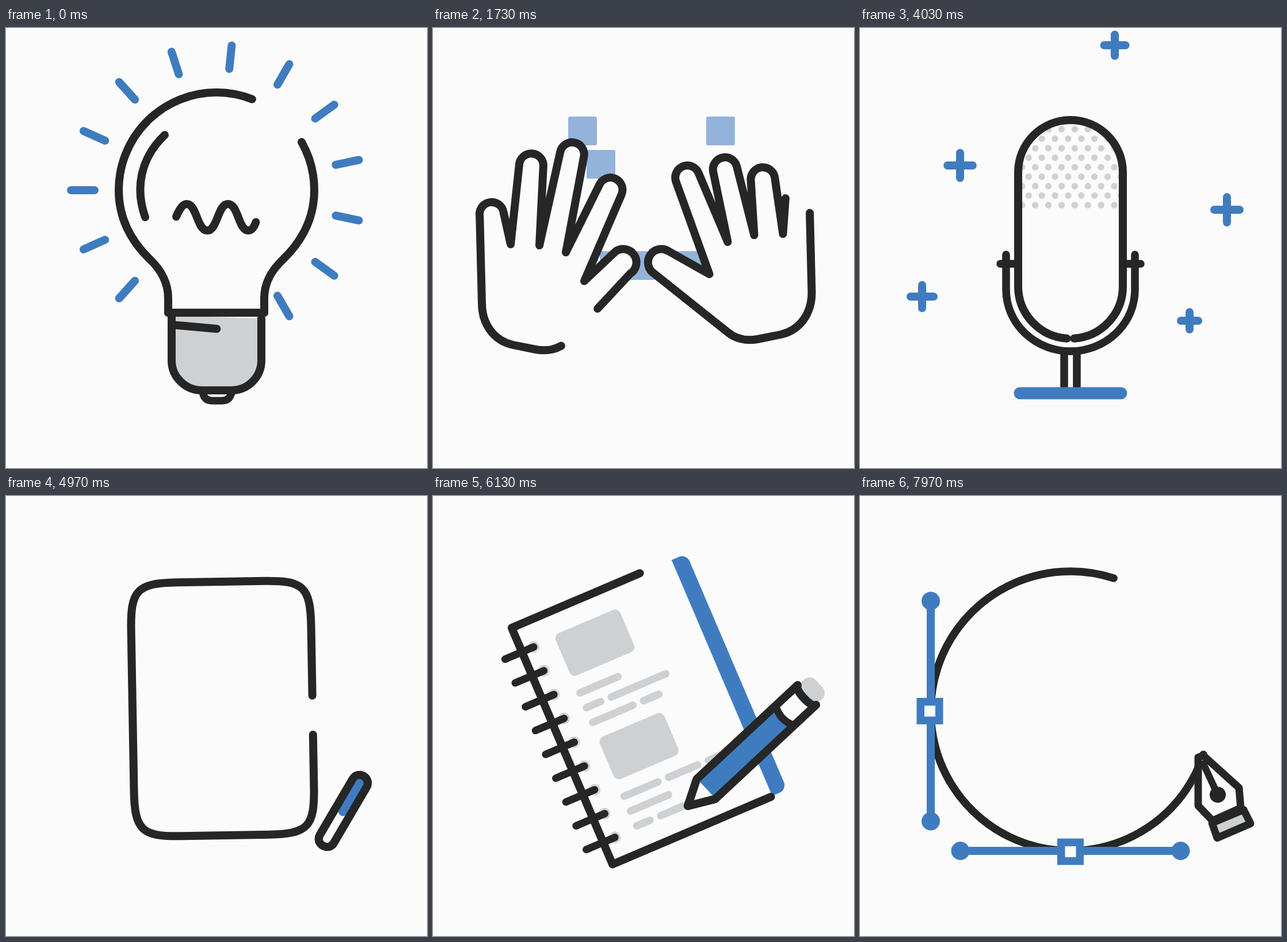
An HTML page for the animation above (8000 ms loop, 732 px wide and 765 px high).

```html
<!DOCTYPE html>
<html lang="en">
<head>
<meta charset="utf-8">
<title>Creative tools</title>
<style>
html, body { margin: 0; width: 100%; height: 100%; overflow: hidden; background: #fbfbfb; }
svg { display: block; width: 100vw; height: 100vh; }
text { font: 700 52px Inter, "Open Sans", sans-serif; text-anchor: middle; }
</style>
</head>
<body>
<svg id="stage" viewBox="0 0 732 765"></svg>
<script>
const LOOP = 8000;
const INK = '#262626', BLUE = '#3f7cbf', GRAY = '#cdd1d4', PAPER = '#fbfbfb';
const stage = document.getElementById('stage');
const updates = [];

const set = (node, attrs) => {
  for (const name in attrs) node.setAttribute(name, attrs[name]);
  return node;
};
const el = (tag, attrs = {}, parent = stage) =>
  parent.appendChild(set(document.createElementNS('http://www.w3.org/2000/svg', tag), attrs));
const stroke = (d, parent, extra = {}) => el('path', {
  d, pathLength: 100, fill: 'none', stroke: INK, 'stroke-width': 14,
  'stroke-linecap': 'round', 'stroke-linejoin': 'round', ...extra
}, parent);
const show = (node, on) => set(node, { display: on ? 'inline' : 'none' });

const clamp = x => Math.max(0, Math.min(1, x));
const smooth = x => { x = clamp(x); return x * x * (3 - 2 * x); };
const ramp = (t, from, to) => smooth((t - from) / (to - from));
const span = (t, inA, inB, outA, outB) => ramp(t, inA, inB) - ramp(t, outA, outB);
const mix = (a, b, p) => a + (b - a) * p;
const mixAll = (a, b, p) => a.map((v, i) => mix(v, b[i], p));
const wave = (t, period) => Math.sin(2 * Math.PI * t / period);

let seed = 7;
const random = () => (seed = seed * 16807 % 2147483647) / 2147483647;

// Shows the part of a path between a and b (0..100, wrapping on closed paths).
function trim(node, a, b) {
  const len = b - a;
  set(node, {
    visibility: len > 0.05 ? 'visible' : 'hidden',
    'stroke-dasharray': len > 99.95 ? 'none' : `${len} ${100 - len}`,
    'stroke-dashoffset': -a
  });
}
const gapAt = (node, centre, width) => trim(node, centre + width / 2, centre + 100 - width / 2);

function bulb() {
  const g = el('g');
  const rays = [];
  for (let k = 0; k < 15; k++) {
    const a = Math.PI * (1 + k * 24 / 180);
    const x = Math.cos(a), y = Math.sin(a);
    if (y < 0.93) rays.push({ x, y, node: stroke('', g, { stroke: BLUE }) });
  }
  const glass = stroke('M282 495V470C282 440 268 419 250 402C216 369 196 330 196 282' +
    'A170 170 0 0 1 536 282C536 330 516 369 482 402C464 419 449 440 449 470V495', g);
  const cap = stroke('M342 634Q345 648 358 648H376Q389 648 392 634', g, { fill: PAPER, 'stroke-width': 13 });
  const socket = stroke('M288 500V578A53 52 0 0 0 341 630H392A52 52 0 0 0 444 578V505', g, { fill: GRAY });
  const thread = stroke('M288 516L444 530', g);
  const bar = stroke('M282 495H449', g);
  const shine = stroke('M276 186C234 226 224 278 242 329', g);
  const filament = stroke('M296 328Q305 306 314 306c18 0 18 46 36 46s18 -46 36 -46s18 46 35 46Q432 352 437 328', g);

  updates.push(t => {
    show(g, t < 1450);
    gapAt(glass, 62, 11.5 * (1 - ramp(t, 0, 160)) + 100 * ramp(t, 950, 1400));
    const out = ramp(t, 950, 1350) * 100;
    for (const part of [cap, socket, bar, shine]) trim(part, out, 100);
    set(socket, { 'fill-opacity': 1 - out / 100 });
    trim(thread, out, Math.max(out, mix(50, 100, clamp(t / 200))));
    trim(filament, out, Math.max(out, mix(96, 100, clamp(t / 80))));
    const outer = 253 + 29 * wave(t, 1400) ** 2;
    const inner = outer - 41 * (1 - ramp(t, 1000, 1250));
    for (const { x, y, node } of rays) {
      set(node, {
        d: `M${366 + x * inner} ${282 + y * inner}L${366 + x * outer} ${282 + y * outer}`,
        visibility: t < 1240 ? 'visible' : 'hidden'
      });
    }
  });
}

function keyboard() {
  const press = (time, x, y, width = 50) => {
    const key = el('rect', { x, y, width, height: 50, rx: 3, fill: '#78a0d3' });
    updates.push(t => set(key, { opacity: clamp(1.6 - Math.abs(t - time) / 100) }));
  };
  press(1650, 235, 154);
  press(1650, 475, 154);
  press(1650, 267, 212);
  press(1650, 290, 388, 185);
  for (let time = 1900; time < 2450; time += 100) {
    const row = Math.floor(random() * 3), column = Math.floor(random() * 9);
    press(time, 55 + row * 27 + column * 60, 154 + row * 58.5);
  }
  press(2585, 101, 271);
  press(2585, 281, 271);
  press(2670, 136, 202);
  press(2670, 535, 154);

  [...'TOP'].forEach((char, i) => {
    const start = 1750 + i * 350;
    const letter = el('text', {
      x: [260, 560, 448][i], fill: GRAY, stroke: GRAY, 'stroke-width': 9, 'stroke-linejoin': 'round'
    });
    letter.textContent = char;
    updates.push(t => set(letter, {
      y: 196 - 100 * clamp((t - start) / 511),
      opacity: span(t, start, start + 100, start + 350, start + 500)
    }));
  });
}

// A left hand; curl lowers each fingertip, spread fans them out.
function handPath(curl, spread, sx, sy, thumb, drop) {
  const valleys = [[71, 360], [119, 363], [169, 365], [215, 377], [247, 427 + drop]];
  const reach = [[95, 291], [158, 218], [223, 210], [285, 268]];
  const at = (x, y) => `${x + sx} ${y + sy}`;
  let d = `M${at(69, 465)}`;
  reach.forEach(([rx, ry], i) => {
    const x = rx + (i - 1.5) * spread - curl[i] * 0.08, y = ry + curl[i];
    const [a, b] = [valleys[i], valleys[i + 1]];
    const dx = x - (a[0] + b[0]) / 2, dy = y - (a[1] + b[1]) / 2;
    const n = 21 / Math.hypot(dx, dy);
    d += `L${at(x + dy * n, y - dx * n)}A21 21 0 0 1 ${at(x - dy * n, y + dx * n)}L${at(...b)}`;
  });
  return d + `L318 ${388 + thumb}A23 23 0 0 1 343 ${427 + thumb}L${at(215, 534)}` +
    `C${at(203, 544)} ${at(185, 550)} ${at(163, 546)}L${at(123, 538)}` +
    `C${at(88, 530)} ${at(69, 500)} ${at(69, 465)}Z`;
}

function hands() {
  const sides = [
    { curls: [[20, 8, -3, 0], [9, 24, 10, 16]], spread: 5, shift: [16, 13], drop: 0, gaps: [87.8, 6] },
    { curls: [[14, 50, 41, -3], [0, 0, 23, 15]], spread: 0, shift: [0, -5], drop: 6, gaps: [10.4, 93.6],
      flip: 'matrix(-1 0 0 1 727.5 0)' }
  ];
  for (const { curls, spread, shift, drop, gaps, flip } of sides) {
    const hand = stroke('', stage, { fill: PAPER, transform: flip || '' });
    updates.push(t => {
      const on = t > 1280 && t < 2990;
      show(hand, on);
      if (!on) return;
      const p = ramp(t, 1730, 2670);
      const tap = t > 1730 && t < 2670 ? 12 * wave(t - 1730, 470) : 0;
      const curl = mixAll(...curls, p).map((c, i) => c + (i % 2 ? tap : -tap));
      set(hand, { d: handPath(curl, spread * (1 - p), shift[0] * (1 - p), shift[1] * (1 - p), drop * p, drop) });
      gapAt(hand, gaps[t < 2200 ? 0 : 1], 100 * (1 - span(t, 1280, 1800, 2620, 2990)));
    });
  }
}

function microphone() {
  const g = el('g');
  const dots = el('pattern', {
    id: 'dots', x: 339, y: 167.5, width: 22.9, height: 33, patternUnits: 'userSpaceOnUse'
  }, el('defs', {}, g));
  for (const [cx, cy] of [[11.45, 8.5], [0, 25], [22.9, 25]]) el('circle', { cx, cy, r: 5.7, fill: GRAY }, dots);
  const grill = el('path', { d: 'M275 314V251A91 91 0 0 1 457 251V314Z', fill: 'url(#dots)' }, g);
  const lines = ['M366 562A112 107 0 0 1 254 455V394', 'M366 562A112 107 0 0 0 478 455V394',
    'M275 410H244', 'M457 410H488', 'M355 564V626', 'M377 564V626'
  ].map(d => stroke(d, g, { 'stroke-width': 13.5 }));
  const base = stroke('', g, { stroke: BLUE, 'stroke-width': 21 });
  const pluses = [[443, 30, 0], [174, 239, 0.2], [638, 316, 0.25], [108, 467, 0.07], [573, 509, 0.75]]
    .map(([x, y, phase]) => ({ x, y, phase, node: stroke('', g, { stroke: BLUE }) }));

  updates.push(t => {
    show(g, t > 3000 && t < 4560);
    set(grill, { opacity: span(t, 3150, 3400, 4200, 4400) });
    const shown = span(t, 3000, 3330, 4220, 4550);
    lines.forEach(line => trim(line, 0, 100 * shown));
    set(base, {
      d: `M${366 - 88 * shown} 635H${366 + 88 * shown}`,
      visibility: shown > 0.01 ? 'visible' : 'hidden'
    });
    const size = span(t, 3050, 3350, 4300, 4550);
    for (const { x, y, phase, node } of pluses) {
      const r = (18.5 + 3.5 * wave(t - 4030 + phase * 800, 800)) * size;
      set(node, {
        d: `M${x - r} ${y}H${x + r}M${x} ${y - r}V${y + r}`,
        visibility: size > 0.02 ? 'visible' : 'hidden'
      });
    }
  });
}

// Rounded frame around the origin, clockwise from the middle of its right side.
function framePath(w, h, r, k) {
  const x = w / 2, y = h / 2, c = r * (1 - k);
  return `M${x} 0V${y - r}C${x} ${y - c} ${x - c} ${y} ${x - r} ${y}H${r - x}` +
    `C${c - x} ${y} ${-x} ${y - c} ${-x} ${y - r}V${r - y}` +
    `C${-x} ${c - y} ${c - x} ${-y} ${r - x} ${-y}H${x - r}` +
    `C${x - c} ${-y} ${x} ${c - y} ${x} ${r - y}Z`;
}

function notebook() {
  // Centre, size, corner radius, corner tightness and turn.
  const capsule = [366, 350, 182, 380, 91, 0.552, 0];
  const sheet = [376.5, 369.5, 313, 441, 80, 0.85, -1];
  const book = [362.5, 376, 300, 447, 0, 0.85, -23.1];
  const paragraphs = [[[72], [27, 103], [76, 29]], [[64, 55, 33], [72], [25, 50]]];

  const g = el('g');
  const blocks = [], words = [];
  paragraphs.forEach((rows, n) => {
    const top = -183 + n * 195.5;
    blocks.push(el('rect', { x: -88, y: top, rx: 10, fill: GRAY }, g));
    rows.forEach((lengths, row) => {
      let x = -85;
      for (const length of lengths) {
        words.push(stroke(`M${x} ${top + 110 + row * 28}h${length}`, g, { stroke: GRAY, 'stroke-width': 13 }));
        x += length + 20;
      }
    });
  });
  const cover = el('path', { fill: BLUE }, g);
  const ringY = Array.from({ length: 9 }, (_, i) => -178 + i * 45);
  const holes = ringY.map(cy => el('circle', { cx: -128, cy, fill: GRAY }, g));
  const frame = stroke('', g);
  const rings = ringY.map(y => stroke(`M-182 ${y}h54`, g, { 'stroke-width': 13 }));

  updates.push(t => {
    show(g, t > 2950 && t < 6550);
    const pose = mixAll(mixAll(capsule, sheet, ramp(t, 4100, 4970)), book, ramp(t, 4970, 5550));
    const [cx, cy, w, h, r, k, turn] = pose;
    set(g, { transform: `translate(${cx} ${cy}) rotate(${turn})` });
    set(frame, { d: framePath(w, h, r, k) });

    const centre = 25 * (1 - ramp(t, 4030, 5100));
    const gap = 1.3 * ramp(t, 3950, 4030) + 3.5 * ramp(t, 4030, 4970) + 25.2 * ramp(t, 4970, 5500);
    const hidden = 100 * (1 - ramp(t, 2950, 3330)) + 70 * ramp(t, 6070, 6500);
    trim(frame, centre + gap / 2, centre + 100 - gap / 2 - hidden);

    const strip = 446 * span(t, 5200, 5600, 6170, 6480);
    set(cover, {
      d: strip > 28 ? `M152 223v${-strip}h14a14 14 0 0 1 14 14v${strip - 28}a14 14 0 0 1 -14 14Z` : ''
    });
    const grown = (i, step) => span(t, 5300 + i * step, 5520 + i * step, 6170 + i * 8, 6370 + i * 8);
    blocks.forEach((block, i) => set(block, { width: 122 * grown(i, 200), height: 80 * grown(i, 200) }));
    words.forEach((word, i) => trim(word, 0, 100 * grown(i, 55)));
    rings.forEach((ring, i) => {
      const out = 6180 + i * 15;
      set(holes[i], { r: 10 * span(t, 4930 + i * 45, 5200 + i * 45, out, out + 170) });
      trim(ring, 0, 100 * span(t, 5080 + i * 45, 5350 + i * 45, out, out + 170));
    });
  });
}

function pencil() {
  const g = el('g');
  const eraser = el('rect', { x: 270, y: -23, height: 46, rx: 14, fill: GRAY }, g);
  const body = stroke('', g, { fill: PAPER });
  const paint = el('rect', { fill: BLUE }, g);
  const outline = stroke('', g);
  const band = stroke('M230 -22Q219 0 230 22', g, { 'stroke-width': 13 });

  updates.push(t => {
    show(g, t > 4600 && t < 6420);
    const arrive = ramp(t, 4600, 4970), leave = ramp(t, 6200, 6420), p = ramp(t, 4970, 5450);
    const scribble = t > 5500 && t < 6130 ? wave(t - 6130, 210) : 0;
    const x = mix(mix(640, 558, arrive), 443, p) + 25 * scribble;
    const y = mix(mix(700, 596, arrive), 539, p) - 20 * scribble - 340 * leave;
    set(g, { transform: `translate(${x} ${y}) rotate(${mix(-59.6, -43, p)}) scale(${arrive - leave})` });

    // A tapered stick with round ends grows into a sharpened pencil.
    const tip = mix(14, 0, p), neck = mix(40, 43, p), half = mix(14, 23.5, p);
    const len = mix(112, 283, p), end = len + mix(19, -10, p);
    const d = `M0 ${-tip}L${neck} ${-half}H${len}C${end} ${-half} ${end} ${half} ${len} ${half}` +
      `H${neck}L0 ${tip}C${-tip * 4 / 3} ${tip} ${-tip * 4 / 3} ${-tip} 0 ${-tip}Z`;
    set(body, { d });
    set(outline, { d });
    const inset = mix(8, 18, p), left = mix(47, 44, p);
    set(paint, {
      x: left, y: -inset, width: mix(122, 229, p) - left, height: 2 * inset, rx: mix(8, 4, p)
    });
    const late = ramp(t, 5350, 5500);
    set(band, { opacity: late });
    set(eraser, { width: 42 * late });
  });
}

function penCurve() {
  const g = el('g');
  const point = deg => {
    const a = deg * Math.PI / 180;
    return [366 + 243 * Math.cos(a), 374 + 243 * Math.sin(a)];
  };
  const arc = stroke(`M${point(-72).join(' ')}A243 243 0 0 0 ${point(108).join(' ')}` +
    `A243 243 0 0 0 ${point(-72).join(' ')}`, g, { 'stroke-width': 13.5 });

  const anchor = (x, y, turn, start, end) => {
    const handle = el('g', { transform: `translate(${x} ${y}) rotate(${turn})`, fill: BLUE }, g);
    const line = stroke('', handle, { stroke: BLUE, 'stroke-linecap': 'butt' });
    const knobs = [-1, 1].map(side => ({ side, node: el('circle', {}, handle) }));
    const box = el('g', { transform: 'translate(0 1.5)' }, handle);
    el('rect', { x: -23, y: -23, width: 46, height: 46 }, box);
    el('rect', { x: -9.5, y: -9.5, width: 19, height: 19, fill: PAPER }, box);
    updates.push(t => {
      show(handle, t > start);
      const reach = 191.5 * ramp(t, start, end);
      set(line, { d: `M${-reach} 0H${reach}` });
      knobs.forEach(({ side, node }) => set(node, { cx: side * reach, r: 16 * ramp(t, start, start + 150) }));
    });
  };
  anchor(123, 374, 90, 6420, 6850);
  anchor(366, 617, 0, 7080, 7540);

  const nib = el('g', {}, g);
  stroke('M-3 5L6 2L68 58L71 93L22 115L-3 89Z', nib, { fill: PAPER, 'stroke-width': 13 });
  stroke('M6 16L31 70', nib, { 'stroke-width': 12 });
  el('circle', { cx: 31, cy: 70, r: 14, fill: INK }, nib);
  stroke('M21 119L76 96L88 120L30 145Z', nib, { fill: GRAY, 'stroke-width': 13 });

  updates.push(t => {
    show(g, t > 6200);
    const swept = 108 * ramp(t, 6220, 6420) + 90 * ramp(t, 6420, 7050) + 72 * ramp(t, 7520, 7980);
    trim(arc, 0, swept / 3.6);
    const [x, y] = point(-72 - swept);
    set(nib, { transform: `translate(${x - 6} ${y}) scale(${ramp(t, 6200, 6380)})` });
  });
}

[bulb, keyboard, hands, microphone, notebook, penCurve, pencil].forEach(build => build());

const origin = performance.now();
function tick() {
  const t = (performance.now() - origin) % LOOP;
  updates.forEach(update => update(t));
  requestAnimationFrame(tick);
}
tick();
</script>
</body>
</html>
```
